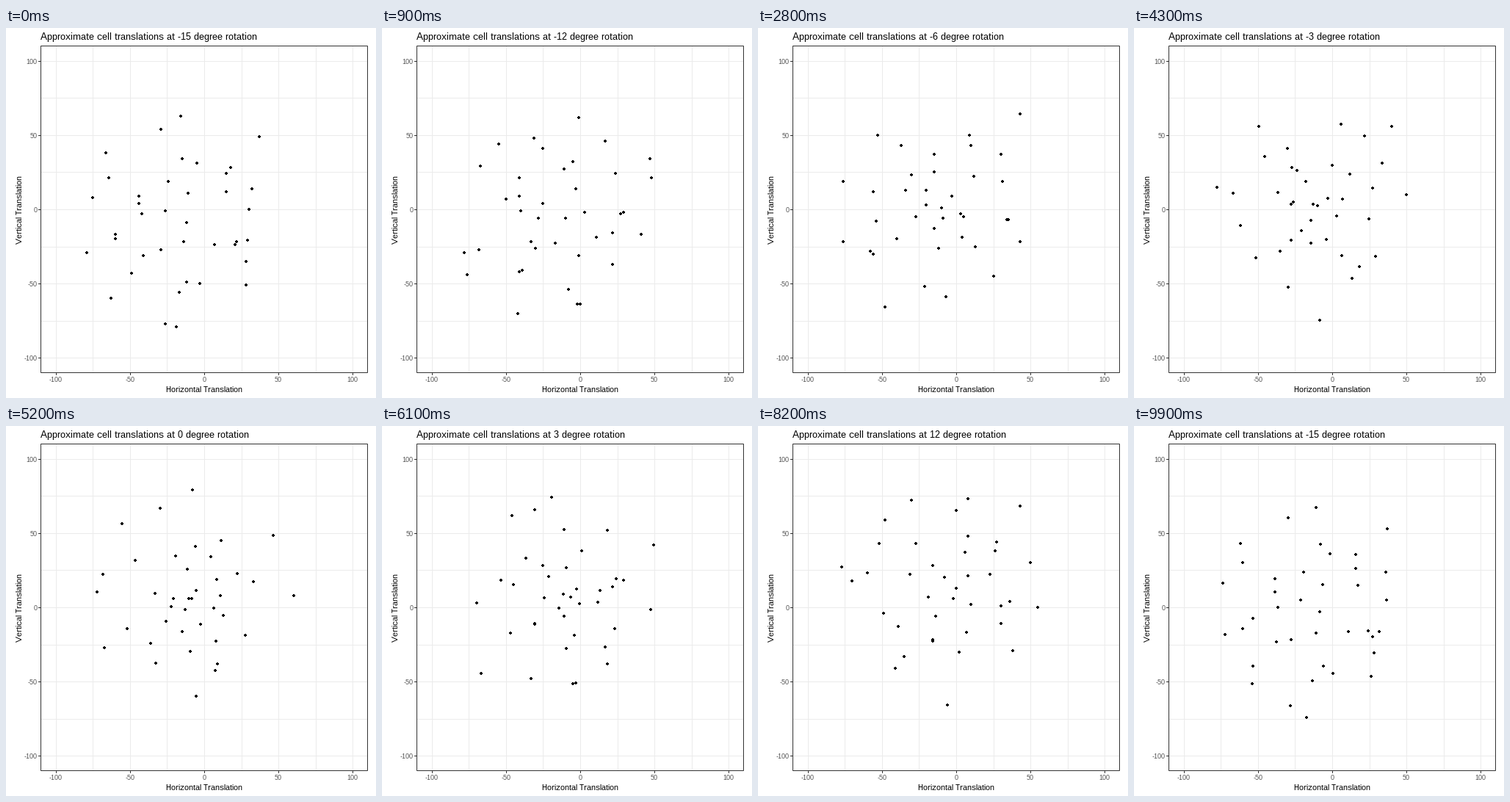
These frames come from a looping animation (504 by 504 pixels, 10 s). A matplotlib script:

```python
import matplotlib.pyplot as plt
import numpy as np
from matplotlib.animation import FuncAnimation
from matplotlib.collections import LineCollection
from matplotlib.patches import Rectangle

SIZE, DPI = 504, 72
FRAMES, INTERVAL = 100, 100
LEFT, TOP, SIDE = 47, 24, 445
UNIT = SIDE / 220
ANGLES = np.arange(-15, 16, 3)
STATES = len(ANGLES)
CELLS = 39
SEARCH_LIMIT = 79

plt.rcParams.update({
    "font.family": "Liberation Sans",
    "text.hinting": "native",
    "text.hinting_factor": 1,
})

# Cells spread evenly round the centre, in a spiral.
rng = np.random.default_rng(15)
reach = np.sqrt((np.arange(CELLS) + 0.5) / CELLS)[:, None]
bearing = np.arange(CELLS) * np.pi * (3 - np.sqrt(5))
heading = np.column_stack([np.cos(bearing), np.sin(bearing)])


def translations(angle):
    """Whole-pixel shifts, huddled near zero rotation and loose far from it."""
    centre = np.array([-10 + 0.5 * angle, 4 + 0.8 * angle])
    huddle = 1.9 - 0.055 * abs(angle - 1)
    jitter = rng.normal(0, 12, (CELLS, 2)) * reach
    shift = centre + 68 * reach ** huddle * heading + jitter
    return np.rint(np.clip(shift, -SEARCH_LIMIT, SEARCH_LIMIT))


poses = [translations(angle) for angle in ANGLES]

# Hold each state, then glide linearly to the next; two glides are longer.
order = np.arange(STATES)
starts = 4 + 9 * order + np.minimum(order, 2)
ends = starts + np.where(order < 2, 5, 4)
knots = np.column_stack([starts, ends]).ravel()
levels = np.column_stack([order, order + 1]).ravel()


def to_px(xy):
    return np.rint(np.array([269.95, 246.95]) + xy * [UNIT, -UNIT])


def dot_segments(centres):
    """Crossed 4 by 2 px bars: a 4 px dot without its corners."""
    bars = [np.stack([centres - arm, centres + arm], axis=1)
            for arm in (np.array([2, 0]), np.array([0, 2]))]
    return np.concatenate(bars)


fig = plt.figure(figsize=(SIZE / DPI, SIZE / DPI), dpi=DPI, facecolor="white")
ax = fig.add_axes([0, 0, 1, 1])
ax.set(xlim=(0, SIZE), ylim=(SIZE, 0))
ax.axis("off")


def line(xs, ys, color):
    ax.plot(xs, ys, color=color, lw=1, solid_capstyle="butt", snap=False,
            zorder=1)


right, bottom = LEFT + SIDE, TOP + SIDE
for value in range(-100, 101, 25):
    x, y = to_px(np.array([value, value])) + 0.5
    line([x, x], [TOP, bottom], "#EBEBEB")
    line([LEFT, right], [y, y], "#EBEBEB")
    if value % 50 == 0:
        line([x, x], [bottom + 1, bottom + 4], "#333333")
        line([LEFT - 3, LEFT], [y, y], "#333333")
        label = dict(size=9, color="#4D4D4D", va="baseline")
        ax.text(x - 0.5, 482, str(value), ha="center", **label)
        ax.text(42.5, y + 3.5, str(value), ha="right", **label)

ax.add_patch(Rectangle((LEFT + 0.5, TOP + 0.5), SIDE, SIDE, fill=False,
                       ec="#333333", lw=1, snap=False, zorder=4))
ax.text(270, 496, "Horizontal Translation", size=11, ha="center",
        va="baseline")
ax.text(22, 247, "Vertical Translation", size=11, rotation=90,
        rotation_mode="anchor", ha="center", va="baseline")
title = ax.text(47, 16, "", size=13, va="baseline")
dots = LineCollection([], colors="black", linewidths=2, capstyle="butt",
                      zorder=3)
ax.add_collection(dots, autolim=False)


def draw(frame):
    step = np.interp(frame, knots, levels)
    k = int(step)
    t = step - k
    place = (1 - t) * poses[k] + t * poses[(k + 1) % STATES]
    dots.set_segments(dot_segments(to_px(place)))
    angle = ANGLES[int(np.ceil(step - 0.5)) % STATES]
    title.set_text(
        f"Approximate cell translations at {angle} degree rotation")
    return dots, title


anim = FuncAnimation(fig, draw, frames=FRAMES, interval=INTERVAL,
                     repeat=True, repeat_delay=0)
plt.show()
```
